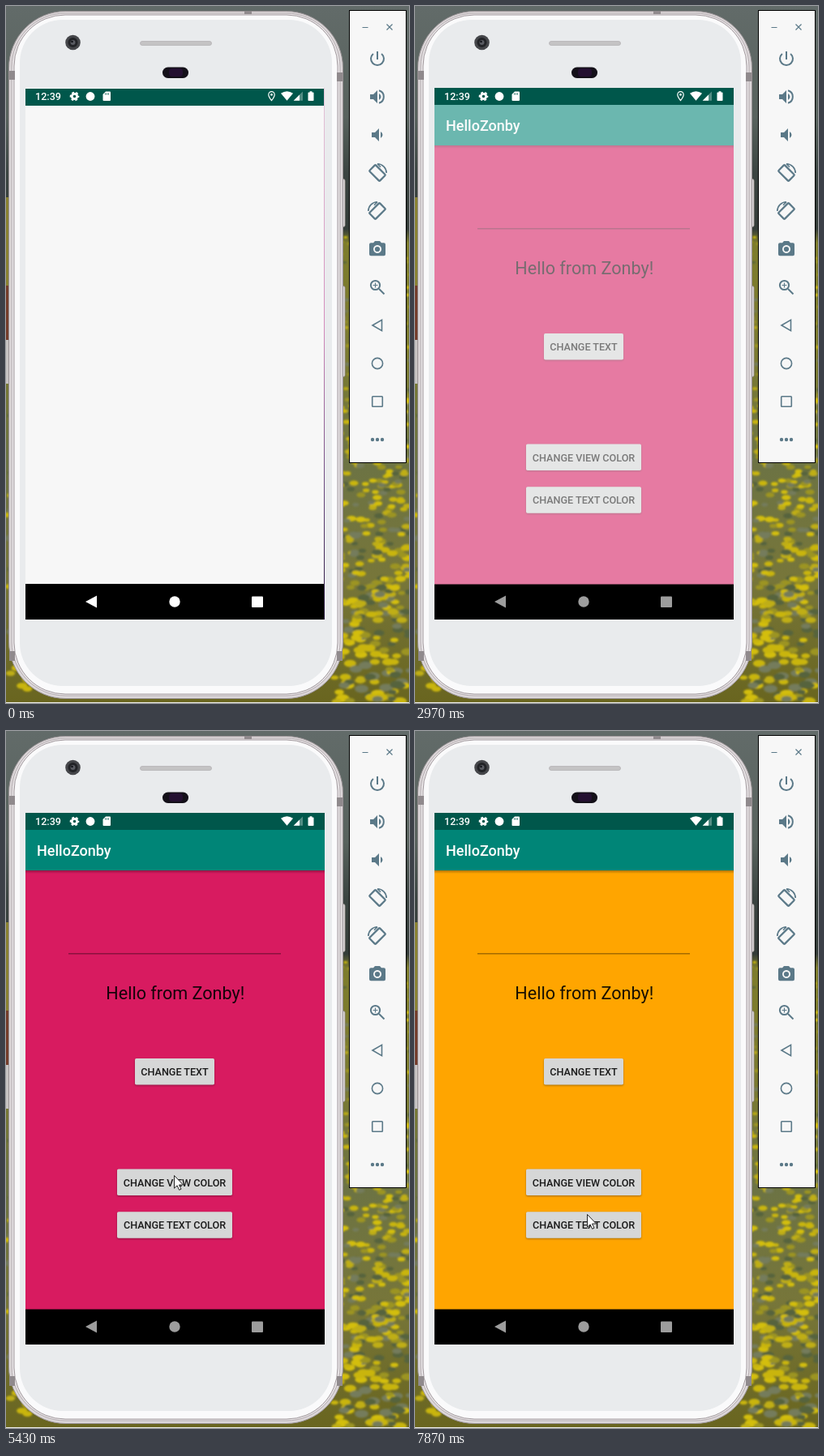
Write an HTML page that moves like this. It is 497 by 860 pixels and loops after 8000 ms.

```html
<!DOCTYPE html>
<html lang="en">
<head>
<meta charset="utf-8">
<title>Phone emulator</title>
<style>
html, body { margin: 0; width: 100%; height: 100%; overflow: hidden; background: #59625c; }
svg { display: block; width: 497px; height: 860px; font-family: Roboto, "Noto Sans", sans-serif; }
.label { font-size: 12.6px; font-weight: 500; text-anchor: middle; fill: #1b1b1b; }
.button rect { fill: #d6d7d7; filter: drop-shadow(0 1px 1px rgba(0,0,0,.35)); }
.button.pressed rect { fill: #bababa; filter: drop-shadow(0 3px 2.5px rgba(0,0,0,.42)); }
.tools { fill: #5b7988; stroke: none; }
.tools .line { fill: none; stroke: #5b7988; stroke-width: 2; }
.tools .thin { stroke-width: 1.6; }
</style>
</head>
<body>
<svg viewBox="0 0 497 860">
  <defs>
    <linearGradient id="field" x2="0" y2="1">
      <stop offset="0" stop-color="#626b69"/>
      <stop offset=".16" stop-color="#58625d"/>
      <stop offset=".24" stop-color="#3b4441"/>
      <stop offset=".32" stop-color="#343c38"/>
      <stop offset=".34" stop-color="#7d7c2c"/>
      <stop offset=".5" stop-color="#7b7a30"/>
      <stop offset=".65" stop-color="#6c7344"/>
      <stop offset=".82" stop-color="#77763a"/>
      <stop offset="1" stop-color="#69651f"/>
    </linearGradient>
    <linearGradient id="barShadow" x2="0" y2="1">
      <stop offset="0" stop-opacity=".3"/>
      <stop offset="1" stop-opacity="0"/>
    </linearGradient>
    <linearGradient id="edge" x2="0" y2="1">
      <stop offset="0" stop-color="#e3c6d8"/>
      <stop offset=".45" stop-color="#d48bbd"/>
      <stop offset=".75" stop-color="#6b4a80"/>
      <stop offset="1" stop-color="#24123a"/>
    </linearGradient>
    <filter id="soft"><feGaussianBlur stdDeviation="1.300"/></filter>
  </defs>

  <rect width="497" height="860" fill="url(#field)"/>
  <g id="flowers" filter="url(#soft)"></g>
  <rect y="236" width="5" height="109" fill="#8a8232"/>
  <rect y="345" width="5" height="67" fill="#743d2b"/>
  <rect y="412" width="5" height="54" fill="#c6c3c2"/>
  <rect y="859" width="497" height="1" fill="#eeeeec"/>

  <g id="phone">
    <g fill="#e6e2e4" stroke="#99928f">
      <rect x="412.500" y="213.500" width="5.500" height="59" rx="2"/>
      <rect x="412.500" y="345.500" width="5.500" height="112" rx="2"/>
    </g>
    <rect x="3.500" y="6.500" width="412" height="848" rx="70" fill="#dcd7d9" stroke="#999295"/>
    <rect x="7" y="9" width="405" height="842" rx="66" fill="#e6e2e4" stroke="#b5adb1"/>
    <rect x="10" y="11" width="399" height="838" rx="63" fill="#fafafb" stroke="#a39b9f"/>
    <rect x="17" y="17" width="385" height="822" rx="53" fill="#e9ebed"/>
    <g fill="#908a8d">
      <rect x="4" y="80" width="7" height="11"/>
      <rect x="408" y="82" width="7" height="11"/>
      <rect x="4" y="796" width="7" height="12"/>
      <rect x="408" y="796" width="7" height="12"/>
      <rect x="294" y="6" width="9" height="4"/>
    </g>
    <circle cx="82.500" cy="45" r="9.300" fill="#45464a"/>
    <circle cx="82.500" cy="45" r="6" fill="#222327"/>
    <circle cx="82.500" cy="45" r="3" fill="#595b62"/>
    <circle cx="81.500" cy="44" r="1.300" fill="#111217"/>
    <rect x="165.500" y="43.500" width="88" height="5" rx="2.500" fill="#c4c3c4" stroke="#b5b3b5" stroke-width=".8"/>
    <rect x="193" y="75.500" width="32" height="13.500" rx="6.700" fill="#141019"/>
    <rect x="201" y="77" width="17" height="10" rx="4" fill="#241031"/>
  </g>

  <rect id="screen" x="24" y="101" width="369" height="656" fill="#fafafa"/>

  <g id="app">
    <rect id="view" x="24" y="172" width="369" height="542"/>
    <rect x="24" y="122" width="369" height="50" fill="#008577"/>
    <rect x="24" y="172" width="369" height="4" fill="url(#barShadow)"/>
    <text x="38" y="154" font-size="18" font-weight="500" fill="#fff">HelloZonby</text>
    <rect x="77" y="274" width="262" height="1.500" fill="#000" opacity=".36"/>
    <text x="208.800" y="331" font-size="21.600" text-anchor="middle" fill="#000" fill-opacity=".9">Hello from Zonby!</text>
    <g class="button"><rect x="159" y="404" width="98" height="32.500" rx="1.800"/><text class="label" x="208" y="425">CHANGE TEXT</text></g>
    <g class="button" id="viewButton"><rect x="137" y="540.500" width="142" height="32.500" rx="1.800"/><text class="label" x="208" y="561.500">CHANGE VIEW COLOR</text></g>
    <g class="button"><rect x="137" y="593.300" width="142" height="32.500" rx="1.800"/><text class="label" x="208" y="614">CHANGE TEXT COLOR</text></g>
  </g>

  <rect id="status" x="24" height="21" width="369" fill="#00574b"/>
  <g fill="#fff" transform="translate(0 -.5)">
    <text x="36" y="116.700" font-size="12.600" font-weight="500">12:39</text>
    <g transform="translate(84.500 112)" fill="none" stroke="#fff">
      <circle r="3.200" stroke-width="2.800"/>
      <circle r="4.900" stroke-width="1.800" stroke-dasharray="2.800 2.331" stroke-dashoffset="1.400"/>
    </g>
    <circle cx="104" cy="112" r="5.400"/>
    <path d="M123 106h5q1 0 1 1v9.500q0 1-1 1h-7.500q-1 0-1-1V109.500z"/>
    <path d="M122.500 108v2m2-2v2m2-2v2" stroke="#00574b" stroke-width=".9"/>
    <g id="pin" transform="translate(-.5 -.3)">
      <path d="M328 117.300C325.500 114.200 324.300 112.300 324.300 110.200a3.700 3.700 0 0 1 7.400 0C331.700 112.300 330.500 114.200 328 117.300z" fill="none" stroke="#fff" stroke-width="1.200"/>
      <circle cx="328" cy="110.200" r="1.300"/>
    </g>
    <path d="M339 108.300Q346.500 103.300 354 108.300L346.500 117.300z"/>
    <path d="M366 106v11.300h-11.300z" opacity=".32"/>
    <path d="M362 110v7.300h-7.300z"/>
    <path d="M374.600 105.800h2.800v1.200h1.400q.7 0 .7.700v9q0 .8-.8.800h-5.400q-.8 0-.8-.8v-9q0-.7.700-.7h1.400z"/>
  </g>

  <rect id="nav" x="24" height="44" width="369" fill="#000"/>
  <g id="navIcons">
    <path d="M98 735l14-7.500v15z"/>
    <circle cx="208" cy="735" r="6.700"/>
    <rect x="303" y="728.500" width="14" height="13.500" rx="1"/>
  </g>
  <rect id="fringe" x="392" y="101" width="1" height="656" fill="url(#edge)"/>

  <rect x="423.500" y="5.500" width="70" height="558" fill="#f7f7f7" stroke="#000"/>
  <g class="tools">
    <path class="line" style="stroke-width:1.200" d="M439.500 26.500h7M469.500 22.500l7 7m0-7l-7 7"/>
    <path class="line" transform="translate(458 65)" d="M0-9V1M-5.100-6.100A8 8 0 1 0 5.100-6.100"/>
    <g transform="translate(458 112)">
      <path d="M-9-3h4l5-5v16l-5-5h-4zM2-4q2.500 1.300 2.500 4t-2.500 4z"/>
      <path class="line" d="M2-7.700a8 8 0 0 1 0 15.400"/>
    </g>
    <path transform="translate(458 159)" d="M-7-3h4l5-5v16l-5-5h-4zM4-4q2.500 1.300 2.500 4t-2.500 4z"/>
    <g id="turn" transform="translate(458 206)">
      <rect class="line" x="-8" y="-4.800" width="16" height="9.600" rx="1" transform="rotate(45) scale(1.120)"/>
      <path class="line thin" d="M0-11.200A11.200 11.200 0 0 1 11.200 0M0-11.200l4 4"/>
    </g>
    <use href="#turn" transform="translate(916 47) scale(-1 1)"/>
    <path fill-rule="evenodd" d="M455 290h6l2 2.200h3q2 0 2 2v12q0 2-2 2h-16q-2 0-2-2v-12q0-2 2-2h3zM458 295a5 5 0 1 0 .1 0z"/>
    <circle cx="458" cy="300" r="3.100"/>
    <g transform="translate(458 347)">
      <circle class="line" cx="-2.500" cy="-2.500" r="5.600"/>
      <path class="line" d="M2 2l6.500 6.500"/>
      <path class="line" style="stroke-width:1.200" d="M-5.500-2.500h6m-3-3v6"/>
    </g>
    <path class="line thin" d="M452 394l11.500-6.600v13.200z"/>
    <circle class="line thin" cx="458" cy="441" r="6.600"/>
    <rect class="line thin" x="451.700" y="481.700" width="12.600" height="12.600" rx=".8"/>
    <circle cx="452" cy="535" r="2.200"/><circle cx="458" cy="535" r="2.200"/><circle cx="464" cy="535" r="2.200"/>
  </g>

  <path id="cursor" d="M.5.500V16.200L4.100 12.900L6.600 18.300L9 17.200L6.500 12H11.500z" fill="#fff" stroke="#111" stroke-width=".9"/>
</svg>
<script>
const LOOP = 8000;
const byId = id => document.getElementById(id);
const set = (id, attrs) => {
  for (const name in attrs) byId(id).setAttribute(name, attrs[name]);
};
const show = (id, on) => set(id, { visibility: on ? 'visible' : 'hidden' });

// Latest value whose start time has been reached.
const stepAt = (steps, t) => steps.filter(([start]) => start <= t).pop()[1];

const navTone = [[0, 255], [580, 240], [830, 218], [970, 198], [1090, 176], [1340, 157]];
const appOpacity = [[0, 0], [2970, .57], [3090, 1]];
const cursorPath = [
  [0, null], [4770, [3, 591]], [4890, [72, 560]], [5040, [134, 553]],
  [5160, [188, 549]], [5280, [206, 548]], [5430, [207, 548]],
  [7450, [207, 566]], [7600, [209, 582]], [7750, [211, 591]], [7870, [212, 596]]
];

// Soft meadow: blooms grow and thin out towards the bottom.
function plantFlowers() {
  let seed = 17;
  const random = () => (seed = seed * 16807 % 2147483647) / 2147483647;
  const tones = ['#c9b50c', '#d3be08', '#bfae14', '#9c9424', '#56633c', '#747c5c'];
  let shapes = '';
  for (let i = 0; i < 620; i++) {
    const depth = random() ** 1.1;
    const x = i % 7 ? 405 + random() * 95 : random() * 60;
    const y = 284 + depth * 576;
    const size = 1.8 + depth * 4 * (.4 + random() * .7);
    const tone = tones[Math.floor(random() * tones.length)];
    shapes += `<ellipse cx="${x}" cy="${y}" rx="${size * 1.4}" ry="${size * .8}" fill="${tone}"/>`;
  }
  byId('flowers').innerHTML = shapes;
}

function draw(t) {
  const launching = t < 150;
  set('screen', { fill: launching ? '#f7f7f7' : '#fafafa' });
  set('status', { y: launching ? 102 : 101 });
  set('nav', { y: launching ? 713 : 713.5, height: launching ? 44 : 43.5 });
  show('fringe', launching);

  const tone = stepAt(navTone, t);
  set('navIcons', { fill: `rgb(${tone},${tone},${tone})` });
  set('app', { opacity: stepAt(appOpacity, t) });
  set('view', { fill: t < 6710 ? '#d81b60' : '#ffa500' });
  byId('viewButton').classList.toggle('pressed', t >= 6580 && t < 6860);
  show('pin', t < 3490);

  const spot = stepAt(cursorPath, t);
  show('cursor', spot);
  if (spot) set('cursor', { transform: `translate(${spot})` });
}

plantFlowers();
const startTime = performance.now();
function tick() {
  draw((performance.now() - startTime) % LOOP);
  requestAnimationFrame(tick);
}
tick();
</script>
</body>
</html>
```
